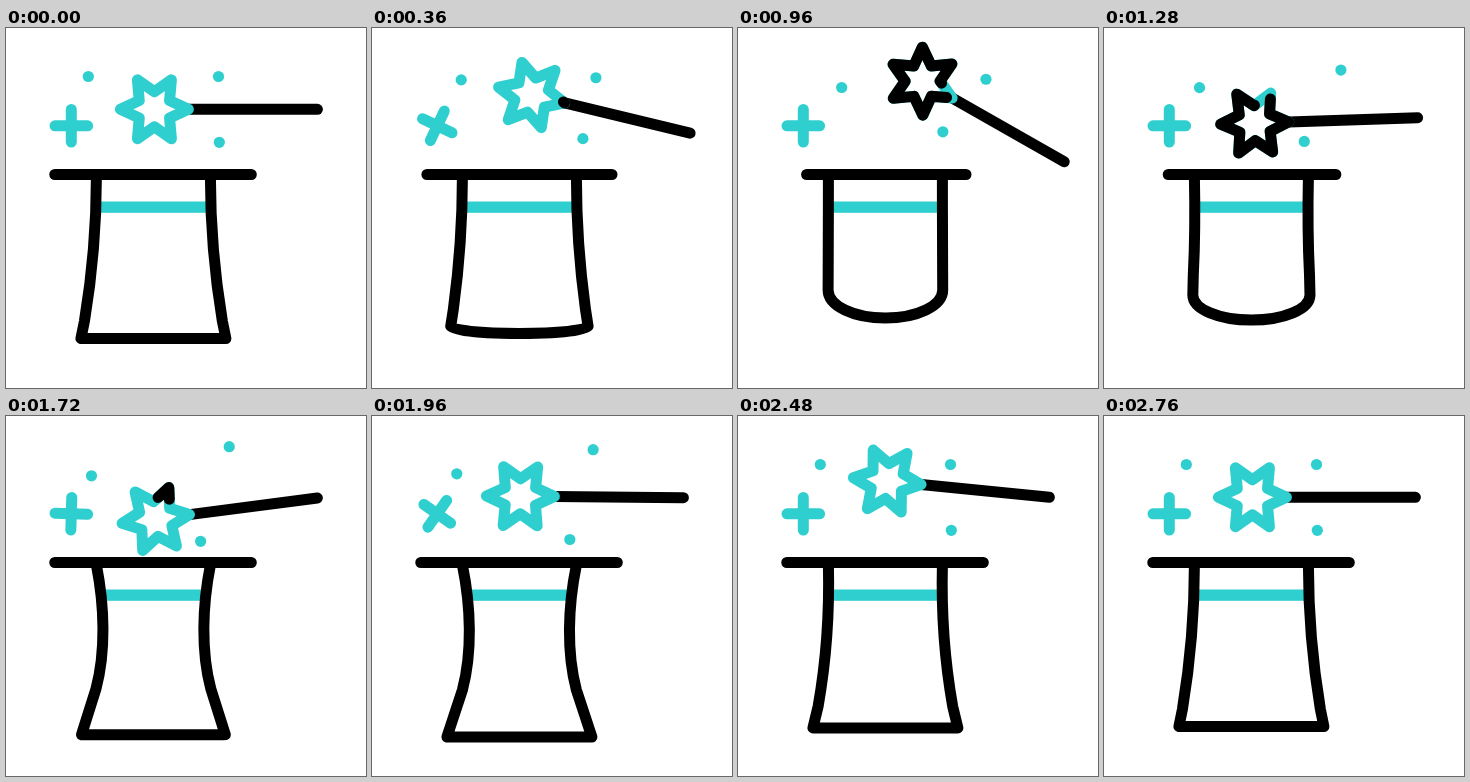
Write an HTML page with a canvas that moves like this. It is 360x360 px and loops after 3 s.

```html
<!DOCTYPE html>
<html lang="en">
<head>
<meta charset="utf-8">
<title>Magic hat</title>
<style>
  html, body { margin: 0; width: 100%; height: 100%; overflow: hidden; background: #fff; }
  canvas { display: block; width: 360px; height: 360px; }
</style>
</head>
<body>
<canvas id="stage"></canvas>
<script>
const LOOP = 3000, STEP = 40;
const TEAL = '#30cfcf', BLACK = '#000';

const canvas = document.getElementById('stage');
const ctx = canvas.getContext('2d');
const ratio = window.devicePixelRatio || 1;
canvas.width = canvas.height = 360 * ratio;

// Eased 0 to 1 between two times.
const ramp = (t, from, to) => {
  const x = Math.min(1, Math.max(0, (t - from) / (to - from)));
  return (1 - Math.cos(Math.PI * x)) / 2;
};

// Rises from a to b, holds, falls from c to d.
const pulse = (t, a, b, c, d) => ramp(t, a, b) - ramp(t, c, d);

function line(x1, y1, x2, y2, color) {
  ctx.strokeStyle = color;
  ctx.beginPath();
  ctx.moveTo(x1, y1);
  ctx.lineTo(x2, y2);
  ctx.stroke();
}

const AXIS = 147.4, TOP = 149, NECK = 57;

// The hat is symmetric: x is measured from the axis, side is -1 or 1.
function hatPath(round, pinch, sag) {
  const cornerX = 72.5 - 15.2 * round;
  const cornerY = 310.5 - 48.5 * round + 10.5 * pinch;
  const bulge = 0.77 * (cornerX - NECK) * (1 - pinch);
  const kneeX = NECK + bulge;
  const kneeY = cornerY - 17.5 - 29.5 * pinch;
  const upperX = NECK - 8.5 * pinch, upperY = TOP + (kneeY - TOP) / 3;
  const lowerX = NECK + 0.4 * bulge - 10 * pinch, lowerY = TOP + (kneeY - TOP) * 0.7;
  const path = new Path2D();
  const x = (side, d) => AXIS + side * d;

  path.moveTo(x(-1, NECK), TOP);
  path.bezierCurveTo(x(-1, upperX), upperY, x(-1, lowerX), lowerY, x(-1, kneeX), kneeY);
  path.lineTo(x(-1, cornerX), cornerY);
  const roundY = cornerY + 0.57 * sag, bottom = cornerY + sag, inner = 0.55 * cornerX;
  path.bezierCurveTo(x(-1, cornerX), roundY, x(-1, inner), bottom, AXIS, bottom);
  path.bezierCurveTo(x(1, inner), bottom, x(1, cornerX), roundY, x(1, cornerX), cornerY);
  path.lineTo(x(1, kneeX), kneeY);
  path.bezierCurveTo(x(1, lowerX), lowerY, x(1, upperX), upperY, x(1, NECK), TOP);
  return path;
}

function drawHat(t) {
  const round = pulse(t, 90, 900, 1160, 1800);
  const pinch = pulse(t, 1160, 1800, 2100, 2600);
  const sag = 28 * pulse(t, 90, 900, 1160, 1740);
  const path = hatPath(round, pinch, sag);
  ctx.save();
  ctx.clip(path);
  ctx.fillStyle = TEAL;
  ctx.fillRect(60, 173.5, 180, 11.3);
  ctx.restore();
  ctx.strokeStyle = BLACK;
  ctx.stroke(path);

  const shrink = pulse(t, 90, 810, 1090, 1700);
  line(48.8 + 19.8 * shrink, 146.5, 245.3 - 17.3 * shrink, 146.5, BLACK);
}

const WAND = 163, TIP = 34, NOTCH = 17.5;
const star = new Path2D();
for (let i = 0; i < 12; i++) {
  const r = i % 2 ? NOTCH : TIP, a = -i * Math.PI / 6;
  star.lineTo(r * Math.cos(a), r * Math.sin(a));
}
star.closePath();
const EDGE = Math.hypot(TIP - NOTCH * Math.cos(Math.PI / 6), NOTCH / 2);

function drawWand(t) {
  const lift = pulse(t, 90, 670, 920, 1400);
  const dip = pulse(t, 920, 1400, 1720, 2210);
  const rebound = pulse(t, 1720, 2210, 2280, 2770);
  const degrees = 30.3 * lift - 7.4 * dip + 8.9 * rebound;
  ctx.save();
  ctx.translate(311.4 + 15.1 * lift, 81.3 + 53.4 * lift + 0.7 * dip);
  ctx.rotate(degrees * Math.PI / 180);
  line(TIP - WAND, 0, 0, 0, BLACK);
  ctx.translate(-WAND, 0);
  ctx.strokeStyle = TEAL;
  ctx.stroke(star);

  // A black trace runs round the star, then is eaten up from its start.
  const erased = 12 * ramp(t, 1120, 1880);
  const length = 12 * ramp(t, 320, 1120) - erased;
  if (length > 0.01) {
    const start = (3 * ramp(t, 320, 2080) + erased) % 12;
    ctx.strokeStyle = BLACK;
    ctx.setLineDash([length * EDGE, (12 - length) * EDGE]);
    ctx.lineDashOffset = -start * EDGE;
    ctx.stroke(star);
  }
  ctx.restore();
}

function drawDots(t) {
  const out = pulse(t, 90, 810, 810, 1780);
  const drift = pulse(t, 810, 1780, 1780, 2430);
  const dot = (x, y, outX, outY, driftX, driftY) => {
    ctx.beginPath();
    ctx.arc(x + outX * out + driftX * drift, y + outY * out + driftY * drift, 5.6, 0, 2 * Math.PI);
    ctx.fill();
  };
  ctx.fillStyle = TEAL;
  dot(82.3, 48.5, 22.5, 11, 3, 11.3);
  dot(212.5, 48.5, 37, 4, 10.5, -18);
  dot(213.3, 114.3, -7.8, -11.8, -18.8, 11.2);
}

function drawPlus(t) {
  const arm = 16.3;
  ctx.save();
  ctx.translate(65.3, 97.8);
  ctx.rotate((ramp(t, 110, 810) + ramp(t, 1660, 2360)) * Math.PI / 2);
  line(-arm, 0, arm, 0, TEAL);
  line(0, -arm, 0, arm, TEAL);
  ctx.restore();
}

function draw(t) {
  ctx.setTransform(ratio, 0, 0, ratio, 0, 0);
  ctx.fillStyle = '#fff';
  ctx.fillRect(0, 0, 360, 360);
  ctx.lineWidth = 11;
  ctx.lineCap = ctx.lineJoin = 'round';
  drawDots(t);
  drawPlus(t);
  drawHat(t);
  drawWand(t);
}

const begin = performance.now();
function tick() {
  const t = (performance.now() - begin) % LOOP;
  draw(Math.floor(t / STEP) * STEP);
  requestAnimationFrame(tick);
}
tick();
</script>
</body>
</html>
```
